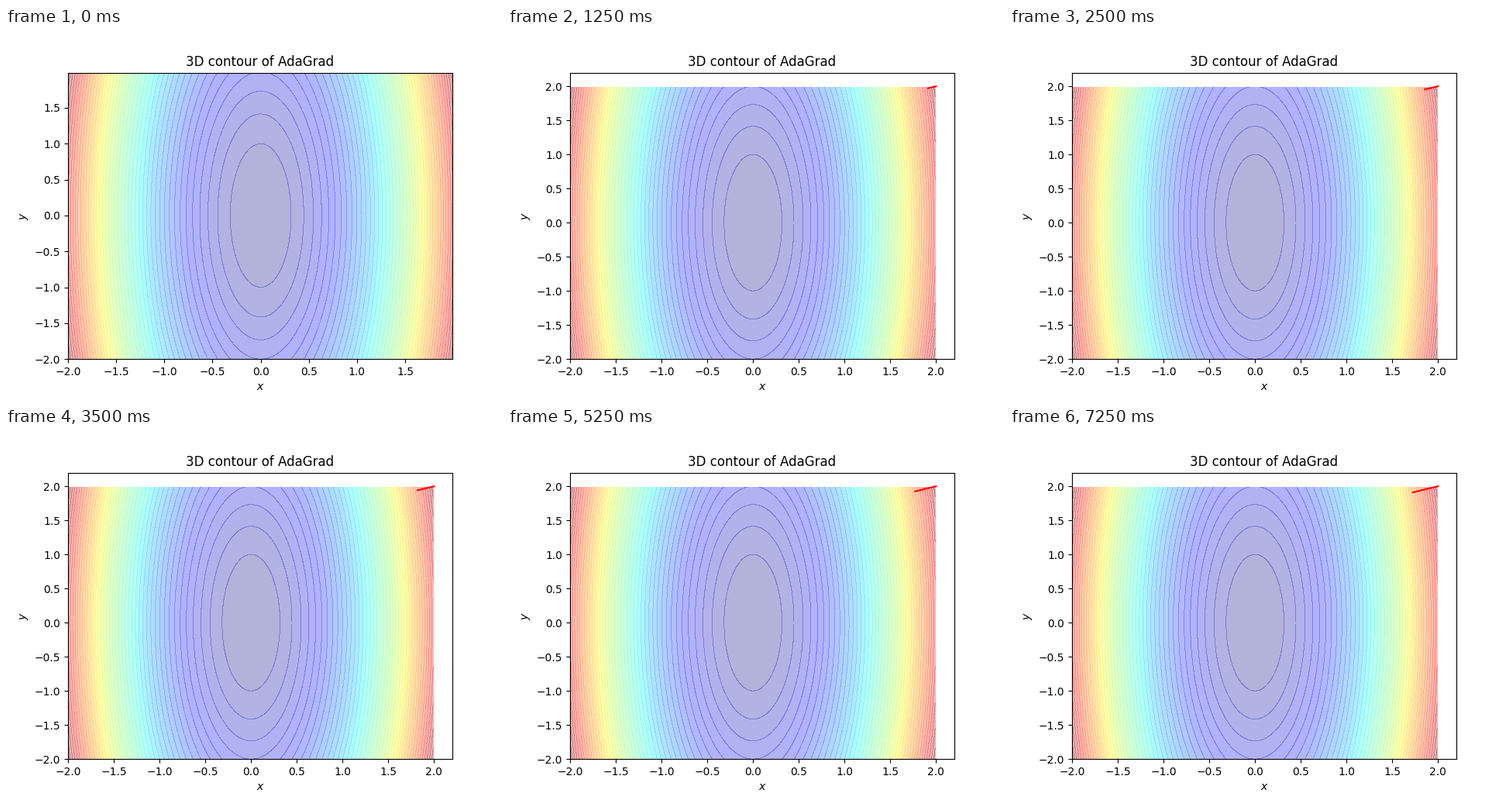
These frames come from a looping animation (640x480 px, 7500 ms). A matplotlib script:

```python
import numpy as np
import matplotlib.pyplot as plt
from matplotlib.animation import FuncAnimation

FRAMES = 30
INTERVAL = 250
RATE = 0.005


def descend(steps):
    """Adaptive descent on 10x^2 + y^2, starting at (2, 2)."""
    pos = np.array([2.0, 2.0])
    total = np.zeros(2)
    path = [pos]
    for _ in range(steps):
        grad = np.array([20.0, 2.0]) * pos
        total = total + grad
        pos = pos - RATE * grad / np.sqrt(total)
        path.append(pos)
    return np.array(path)


fig, ax = plt.subplots(figsize=(6.4, 4.8), dpi=100)
grid = np.arange(-2, 2, 0.01)
x, y = np.meshgrid(grid, grid)
ax.contourf(x, y, 10 * x**2 + y**2, 50, alpha=0.3, cmap="jet")
ax.set_title("3D contour of AdaGrad")
ax.set_xlabel("$x$")
ax.set_ylabel("$y$")

path = descend(FRAMES)
line, = ax.plot([], [], color="red", lw=1.5)


def draw(i):
    # The view widens once the path has its first point.
    top = 2.2 if i else grid[-1]
    ax.set_xlim(-2, top)
    ax.set_ylim(-2, top)
    line.set_data(path[:i, 0], path[:i, 1])
    return line,


anim = FuncAnimation(fig, draw, frames=FRAMES, init_func=lambda: draw(0),
                     interval=INTERVAL, repeat=True, repeat_delay=0)
plt.show()
```
